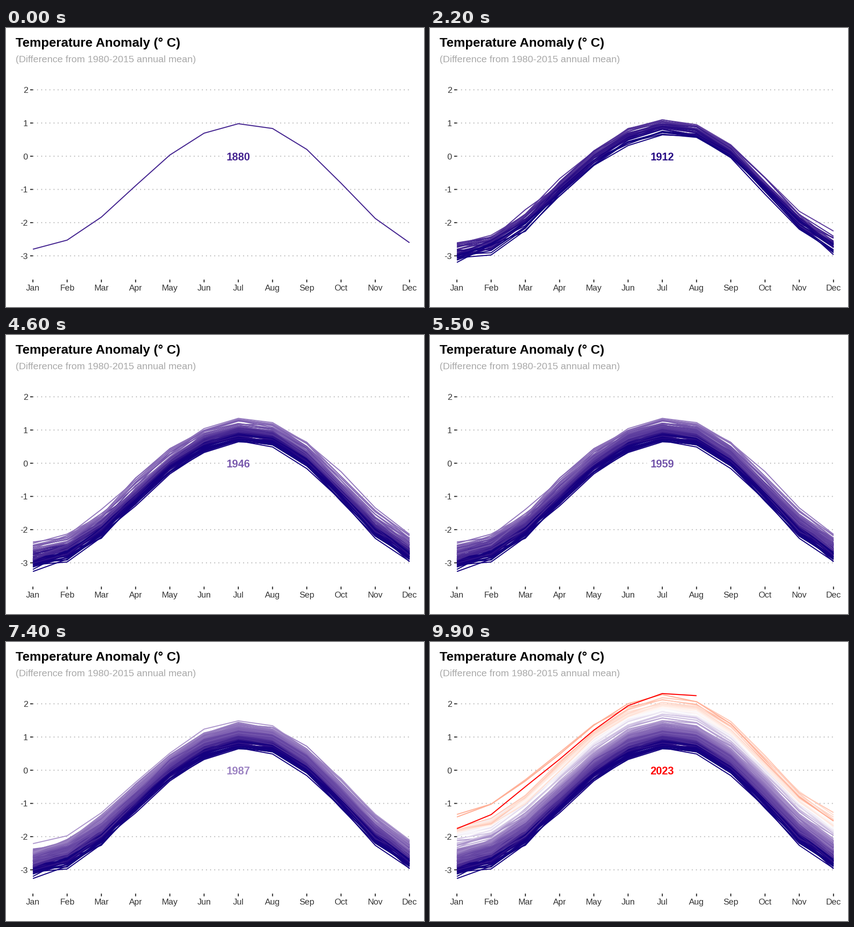
These frames come from a looping animation (917 by 611 pixels, 10000 ms). A matplotlib script:

```python
import numpy as np
import matplotlib.pyplot as plt
from matplotlib.animation import FuncAnimation
from matplotlib.collections import LineCollection
from matplotlib.patches import Rectangle

W, H, DPI = 917, 611, 100
FRAMES = 100
FIRST, LAST, LAST_MONTHS = 1880, 2023, 8
LEFT, RIGHT, ZERO_Y, UNIT = 59, 885.2, 280.8, 72.72
STROKE = 2.26
DARK, GRID = "#333333", "#bebebe"
MONTHS = "Jan Feb Mar Apr May Jun Jul Aug Sep Oct Nov Dec".split()

# Turning points of the long-term anomaly: (time, degrees)
TREND = [
    (1880, -0.17), (1887, -0.36), (1889, -0.05), (1893, -0.38), (1897, -0.10),
    (1910, -0.46), (1915, -0.12), (1917, -0.50), (1930, -0.18), (1944, 0.20),
    (1950, -0.15), (1962, 0.04), (1976, 0.02), (1981, 0.28), (1985, 0.13),
    (1990, 0.43), (1992.5, 0.20), (1998.1, 0.82), (1999, 0.40), (2002, 0.62),
    (2015.4, 0.80), (2016.1, 1.35), (2016.6, 0.88), (2019, 0.90), (2020.1, 1.20),
    (2020.9, 0.85), (2023, 0.87), (2023.17, 1.17), (2023.3, 0.96), (2023.6, 1.24),
]


def season(month):
    """Yearly cycle as a short Fourier sum, on the 1980-2015 baseline."""
    a = 2 * np.pi * month / 12
    return (-0.7 - 1.9225 * np.cos(a) - 0.045 * np.sin(a)
            - 0.034 * np.cos(2 * a) + 0.058 * np.sin(2 * a) + 0.026 * np.cos(3 * a))


def weather(count, winter):
    """Correlated monthly noise, wider in winter and in early years."""
    rng = np.random.default_rng(12)
    noise = rng.standard_normal(12 * count)
    for i in range(1, len(noise)):
        noise[i] = 0.5 * noise[i - 1] + 0.87 * noise[i]
    noise = np.clip(noise.reshape(count, 12), -1.7, 1.7)
    noise -= noise.mean(axis=1, keepdims=True)
    noise[[0, -1]] = 0  # the first and last curves stay clean
    return noise * (0.055 + 0.075 * winter) * np.linspace(1, 0.5, count)[:, None]


def monthly_values():
    month = np.arange(12)
    years = np.arange(FIRST, LAST + 1)[:, None]
    winter = (1 + np.cos(2 * np.pi * (month - 0.5) / 12)) / 2
    trend = np.interp(years + month / 12, *zip(*TREND))
    wobble = 0.07 * np.sin(2 * np.pi * 40 * (years - FIRST) / (LAST - FIRST))
    anomaly = trend + wobble + weather(len(years), winter)
    rows = list(np.maximum(anomaly, -0.53 - 0.2 * winter) + season(month))
    rows[-1] = rows[-1][:LAST_MONTHS]
    return rows


def lab_to_rgb(lab):
    fy = (lab[0] + 16) / 116
    f = np.array([fy + lab[1] / 500, fy, fy - lab[2] / 200])
    xyz = np.where(f > 6 / 29, f ** 3, 3 * (6 / 29) ** 2 * (f - 4 / 29))
    xyz = xyz * [0.9505, 1, 1.089]
    lin = np.clip(np.array([[3.2406, -1.5372, -0.4986],
                            [-0.9689, 1.8758, 0.0415],
                            [0.0557, -0.2040, 1.0570]]) @ xyz, 0, 1)
    return np.where(lin > 0.0031308, 1.055 * lin ** (1 / 2.4) - 0.055, 12.92 * lin)


def diverging(value, limit=1.05):
    """Dark blue - white - red, blended in Lab."""
    white = np.array([100, 0, 0])
    end = np.array([13.5, 48, -63] if value < 0 else [53.2, 80.1, 67.2])
    t = min(abs(value) / limit, 1) ** 0.9
    return lab_to_rgb(white + (end - white) * t)


def px(size):
    return size * 72 / DPI


def y_pos(value):
    return ZERO_Y - UNIT * value


fig = plt.figure(figsize=(W / 100, H / 100), dpi=DPI, facecolor="white")
ax = fig.add_axes([0, 0, 1, 1])
ax.set(xlim=(0, W), ylim=(H, 0))
ax.axis("off")


def text(x, y, s, size, color, **kw):
    return ax.text(x, y, s, fontsize=px(size), color=color,
                   family="Liberation Sans", va="baseline", **kw)


def rule(xs, ys, color, **kw):
    ax.plot(xs, ys, color=color, lw=px(STROKE), solid_capstyle="butt",
            dash_capstyle="butt", snap=False, **kw)


text(21, 41.2, "Temperature Anomaly (° C)", 28.2, "black", weight="bold")
text(21, 74.7, "(Difference from 1980-2015 annual mean)", 21.3, "#a9a9a9")

xs = np.linspace(LEFT, RIGHT, 12)
for v in range(-3, 3):
    y = y_pos(v)
    rule([LEFT, RIGHT], [y, y], GRID, ls=(0, (1, 3)), zorder=1)
    rule([53, LEFT], [y, y], DARK)
    text(48, y + 6.8, str(v), 18.7, DARK, ha="right")
for x, name in zip(xs, MONTHS):
    rule([x, x], [551, 557], DARK)
    text(x, 575.3, name, 18.7, DARK, ha="center")

rows = monthly_values()
paths = [np.column_stack([xs[:len(r)], y_pos(r)]) for r in rows]
colors = [diverging(r.mean()) for r in rows]
colors[-1] = np.array([1.0, 0, 0])

lines = LineCollection([], linewidths=px(STROKE), capstyle="butt",
                       joinstyle="round", zorder=3)
ax.add_collection(lines, autolim=False)
ax.add_patch(Rectangle((476, 265), 67, 32, fc="white", ec="none", zorder=4))
label = text(509.6, 289.5, "", 23.4, "black", weight="bold", ha="center", zorder=5)


def draw(frame):
    last = round(frame * (LAST - FIRST) / (FRAMES - 1))
    lines.set_segments(paths[:last + 1])
    lines.set_color(colors[:last + 1])
    label.set_text(str(FIRST + last))
    label.set_color(colors[last])
    return lines, label


anim = FuncAnimation(fig, draw, frames=FRAMES, interval=100, repeat=True,
                     repeat_delay=0, blit=False)
plt.show()
```
